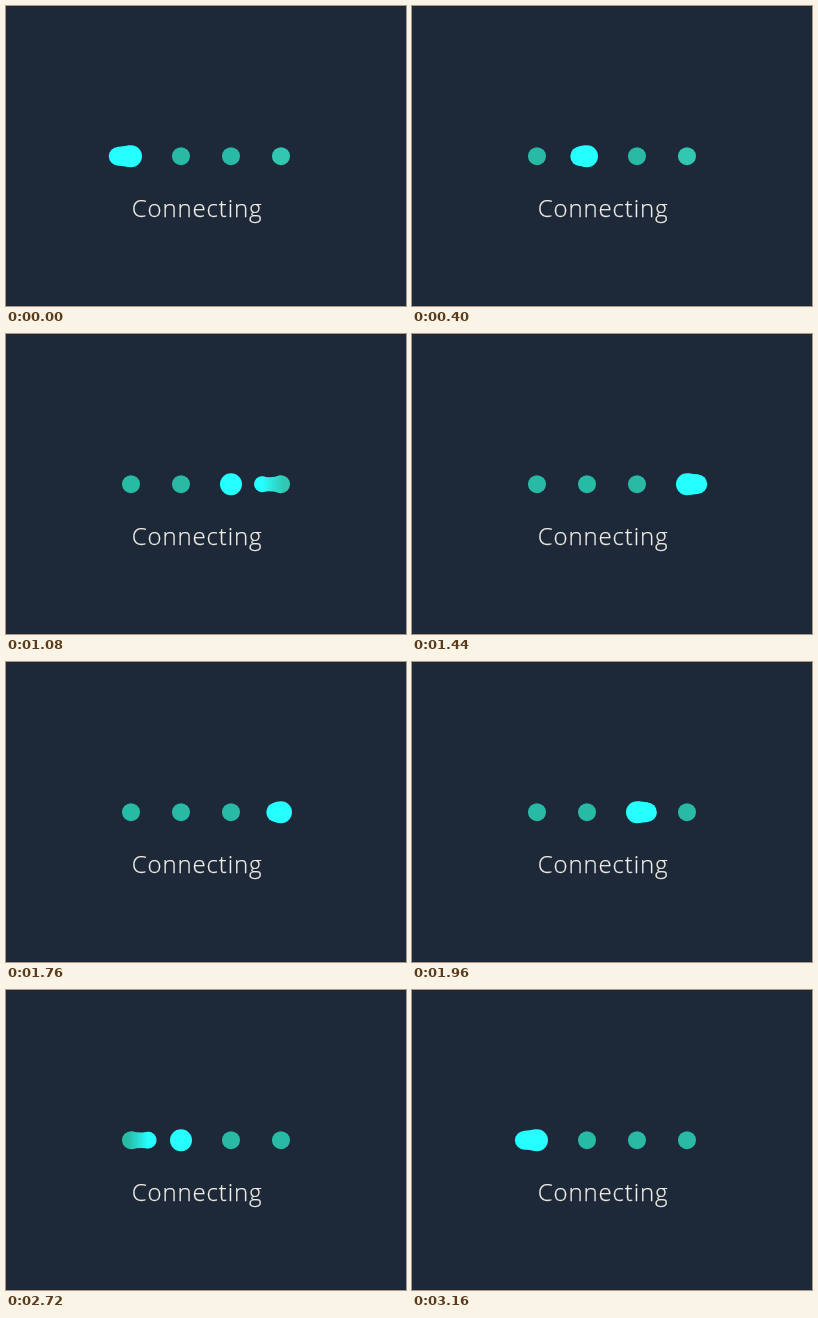
An HTML page with a canvas for the animation above (3200 ms loop, 400 px wide and 300 px high).

```html
<!DOCTYPE html>
<html lang="en">
<head>
<meta charset="utf-8">
<title>Connecting</title>
<style>
  html, body { margin: 0; width: 100%; height: 100%; overflow: hidden; background: #1d2839; }
  canvas { position: absolute; left: 0; top: 0; }
  p {
    position: absolute; left: 125.8px; top: 185px; margin: 0;
    font: 300 24px/34px "Open Sans", sans-serif;
    letter-spacing: 0.85px; white-space: nowrap;
    color: #f0eee6; -webkit-text-stroke: 0.25px #f0eee6;
  }
</style>
</head>
<body>
<canvas id="stage" width="400" height="300"></canvas>
<p>Connecting</p>
<script>
const ctx = document.getElementById('stage').getContext('2d');
const LOOP = 3200, HALF = LOOP / 2, Y = 150.2;
const CYAN = '#26ffff', GREEN = '#28baa5', MINT = '#31c7b0';
const DOTS = [125, 175, 225, 275];
const SMALL = 9, BIG = 11, BALL = 8, REACH = 28;

// One sweep of the ball: [ms, x]
const SWEEP = [
  [0, 112], [80, 118], [360, 164.8], [400, 168], [560, 198], [640, 219],
  [690, 225], [1080, 256], [1200, 261], [1440, 285.5], [1600, 288]
];
// When each dot along a sweep is lit
const LIT = [[-440, 240], [340, 530], [620, 1160], [1160, 1840]];

const slopes = SWEEP.map((p, i) => {
  const a = SWEEP[i - 1], b = SWEEP[i + 1];
  if (!a || !b) return 0;
  const s = (p[1] - a[1]) / (p[0] - a[0]);
  const e = (b[1] - p[1]) / (b[0] - p[0]);
  return 2 * s * e / (s + e);
});

function sweep(u) {
  let i = 0;
  while (i < SWEEP.length - 2 && u > SWEEP[i + 1][0]) i++;
  const [t0, x0] = SWEEP[i], [t1, x1] = SWEEP[i + 1];
  const h = t1 - t0, k = (u - t0) / h, q = 1 - k;
  return x0 * (1 + 2 * k) * q * q + x1 * k * k * (3 - 2 * k)
    + h * k * q * (slopes[i] * q - slopes[i + 1] * k);
}

const within = (u, [a, b]) => u >= a && u < b;

function isLit(i, t) {
  const u = t % HALF, back = t >= HALF;
  if (within(u, LIT[back ? 3 - i : i])) return true;
  // The far dot stays lit after the turn
  return i === 3 && back && u < LIT[3][1] - HALF;
}

function disc(x, r, fill) {
  ctx.fillStyle = fill;
  ctx.beginPath();
  ctx.arc(x, Y, r, 0, Math.PI * 2);
  ctx.fill();
}

// Skin between two discs, pinched as they part
function bridge(x1, r1, x2, r2, fill) {
  const gap = x2 - x1, d = Math.abs(gap);
  if (d <= Math.abs(r1 - r2)) return;
  const c = (r1 - r2) / gap, s = Math.sqrt(1 - c * c);
  const ax = x1 + r1 * c, bx = x2 + r2 * c, ay = r1 * s, by = r2 * s;
  const mid = (ax + bx) / 2;
  const waist = Math.max(1, (ay + by) / 2 - Math.max(0, d - 14) * 0.6);
  ctx.fillStyle = fill;
  ctx.beginPath();
  ctx.moveTo(ax, Y - ay);
  ctx.quadraticCurveTo(mid, Y - waist, bx, Y - by);
  ctx.lineTo(bx, Y + by);
  ctx.quadraticCurveTo(mid, Y + waist, ax, Y + ay);
  ctx.fill();
}

function draw(t) {
  const ball = t < HALF ? sweep(t) : 400 - sweep(t - HALF);
  const dist = x => Math.abs(x - ball);
  const near = DOTS.reduce((a, b) => dist(b) < dist(a) ? b : a);
  // The ball swells as it sinks into a dot
  const sink = Math.min(1, Math.max(0, (19 - dist(near)) / 9));
  const size = BALL + 1.8 * sink;
  ctx.clearRect(0, 0, 400, 300);
  let ballFill = CYAN;
  DOTS.forEach((x, i) => {
    const lit = isLit(i, t), r = lit ? BIG : SMALL;
    const rest = i === 3 && t < 1160 ? MINT : GREEN;
    let fill = lit ? CYAN : rest;
    const joined = x === near && dist(x) < REACH;
    if (joined && !lit) {
      fill = ctx.createLinearGradient(ball, 0, x + Math.sign(x - ball) * 3, 0);
      fill.addColorStop(0, CYAN);
      fill.addColorStop(1, rest);
    }
    disc(x, r, fill);
    if (joined) {
      bridge(ball, size, x, r, fill);
      ballFill = fill;
    }
  });
  disc(ball, size, ballFill);
}

function frame() {
  draw(performance.now() % LOOP);
  requestAnimationFrame(frame);
}
frame();
</script>
</body>
</html>
```
